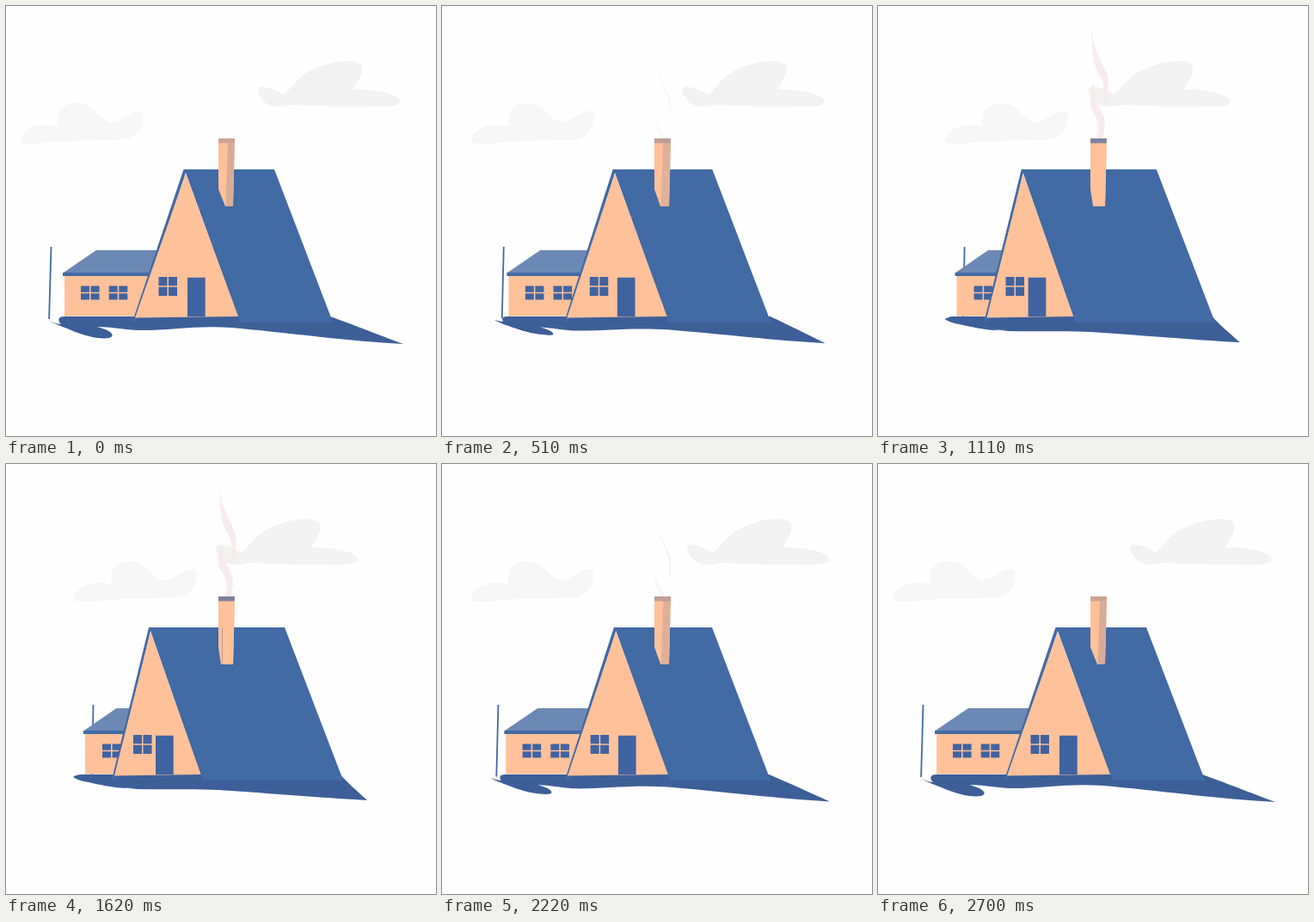
An HTML page for the animation above (3.18 s loop, 500x500 px).

```html
<!DOCTYPE html>
<html lang="en">
<head>
<meta charset="utf-8">
<title>House</title>
<style>
  html, body { margin: 0; width: 100%; height: 100%; overflow: hidden; background: #fefefe; }
  svg { display: block; width: 100%; height: 100%; }
</style>
</head>
<body>
<svg id="scene" viewBox="0 0 500 500"></svg>
<script>
const LOOP = 3180, STEP = 30, OPEN_END = 1350, CLOSE_START = 1590, CLOSE_END = 2700;
const ROOF = '#426aa4', DARK = '#3d5f98', PEACH = '#ffc19a';
const scene = document.getElementById('scene');
const clamp = v => Math.min(1, Math.max(0, v));
const lerp = (a, b, p) => a + (b - a) * p;

// Blends every number in two strings of the same structure.
function mix(a, b, p) {
  const ends = b.match(/[\d.]+/g);
  let i = 0;
  return a.replace(/[\d.]+/g, n => lerp(+n, +ends[i++], p).toFixed(2));
}

// Ease with bezier handles (x1, 0) and (x2, 1).
const ease = (x1, x2) => x => {
  let lo = 0, hi = 1;
  for (let i = 0; i < 24; i++) {
    const s = (lo + hi) / 2, r = 1 - s;
    if (3 * r * r * s * x1 + 3 * r * s * s * x2 + s * s * s < x) lo = s; else hi = s;
  }
  return lo * lo * (3 - 2 * lo);
};

// Progress from the wide pose (0) to the turned pose (1) and back.
const swing = (open, close) => t => t < CLOSE_START
  ? open(clamp(t / OPEN_END))
  : 1 - close(clamp((t - CLOSE_START) / (CLOSE_END - CLOSE_START)));

const track = keys => t => {
  if (t <= keys[0][0]) return keys[0][1];
  for (let i = 1; i < keys.length; i++) {
    const [t0, v0] = keys[i - 1], [t1, v1] = keys[i];
    if (t <= t1) return lerp(v0, v1, (t - t0) / (t1 - t0));
  }
  return keys[keys.length - 1][1];
};

const yard = swing(ease(.6, .15), ease(.75, .24));
const house = swing(ease(.76, .14), ease(.72, .12));
const leftSky = swing(ease(.68, .15), ease(.75, .24));
const rightSky = swing(ease(.68, .15), ease(.56, .17));
const smokeStage = track([[510, 0], [870, 1], [1110, 2], [1590, 2], [1860, 1.7], [2220, 0]]);
const smokeAlpha = track([[400, 0], [510, .35], [700, 1], [2080, 1], [2220, .75], [2400, 0]]);

const updates = [];
function path(fill, d = '') {
  const el = document.createElementNS('http://www.w3.org/2000/svg', 'path');
  el.setAttribute('fill', fill);
  el.setAttribute('d', d);
  scene.append(el);
  return el;
}

function morph(fill, progress, from, to, fillTo) {
  const el = path(fill);
  updates.push(t => {
    const p = progress(t);
    el.setAttribute('d', mix(from, to, p));
    if (fillTo) el.setAttribute('fill', mix(fill, fillTo, p));
  });
  return el;
}

function slide(fill, progress, dx, d) {
  const el = path(fill, d);
  updates.push(t => el.setAttribute('transform', `translate(${dx * progress(t)} 0)`));
}

function smoke(...stages) {
  const el = path('#f8ebeb');
  updates.push(t => {
    const g = smokeStage(t), i = Math.min(1, Math.floor(g));
    el.setAttribute('d', mix(stages[i], stages[i + 1], g - i));
    el.setAttribute('opacity', smokeAlpha(t));
  });
}

const rect = (x, y, w, h) => `M${x} ${y}h${w}v${h}h${-w}z`;
const panes = (x, y, w, h, gap) =>
  [0, 1, 2, 3].map(i => rect(x + (i % 2) * (w + gap), y + (i >> 1) * (h + gap), w, h)).join('');

// Sky
slide('#f6f6f6', leftSky, 62, 'M18 159C15 150 27 138 47 138Q55 138 61 140C59 130 61 113 81 113C103 112 105 131 121 135C133 136 143 121 157 122C163 126 161 152 137 155C120 157 80 156 55 158C45 160 25 161 18 159Z');
slide('#f2f2f2', rightSky, -49, 'M293 98C292 90 312 95 322 103C333 98 336 80 366 70C385 63 411 61 414 70C416 80 408 88 404 97C430 96 459 103 458 111C456 119 440 117 400 117C370 117 345 115 330 115C318 119 303 118 297 107C294 103 293 101 293 98Z');

// Pole, ground and annex
morph(ROOF, yard, 'M51.6 280L53.4 280L51 364L49.2 364Z', 'M100.6 280L102.4 280L101 362L99.2 362Z');
morph(DARK, yard,
  'M68 361L377 361C405 371 440 385 462 393C400 390 320 379 262 374C220 371 185 378 152 377C135 376 122 373 106 373C125 378 127 384 120 386C108 388 90 383 78 378C70 374 56 370 49 365C53 367 59 370 64 370C60 366 60 361 68 361Z',
  'M88 361L389 361C395 369 408 380 420 391C380 389 320 384 262 380C220 377 185 379 152 378C140 377 134 375 126 374C132 375 138 376 142 377C125 377 105 372 96 370C88 369 82 367 78 364C79 363 80 363 82 362C84 361 86 361 88 361Z');
morph(PEACH, yard, 'M68 313L179 313L179 360.5L68 360.5Z', 'M92 313L179 313L179 360.5L92 360.5Z');
morph('#6c89b5', yard, 'M66 310.5L105 284L179 284L179 310.5Z', 'M90 310.5L128.5 284L179 284L179 310.5Z');
morph(ROOF, yard, 'M66 310L179 310L179 314L66 314Z', 'M90 310L179 310L179 314L90 314Z');
slide('#4063a0', yard, 25, panes(87, 325.5, 10, 7.2, 1.6) + panes(119.7, 325.5, 10, 7.2, 1.6));

// Main house
morph(ROOF, house,
  'M206.5 190L312 190L377.5 361L380 368L272 368L209 194L151 367L147 367Z',
  'M166 190L324 190L391 365L392 368L228.5 368L168 194L127 367L123 367Z');
morph(PEACH, house, 'M209 195L270 361L150 362.5Z', 'M168 195L226.5 361L126 362.5Z');
slide('#4063a0', house, -37, rect(211, 315.7, 20.7, 45.6));
slide('#4063a0', house, -29.5, panes(177.5, 315, 10, 10.2, 1.5));

// Chimney
morph(PEACH, house, 'M247 155L266 155L264 233L255 233L247 213Z', 'M247 155L266 155L264 233L250 233L247 213Z');
morph('rgb(217,172,152)', house, 'M258 159L266 155L264 233L255.5 233Z', 'M251.5 159L266 155L264 233L251 233Z', 'rgb(255,193,154)');
morph('rgb(207,163,146)', house, 'M247 154L266 154L265.7 159.5L247 159.5Z', 'M247 154L266 154L265.7 159.5L247 159.5Z', 'rgb(125,129,159)');
const seam = path('#a58c90', rect(251, 190, .7, 43));
updates.push(t => seam.setAttribute('opacity', house(t) > .985 ? 1 : 0));

smoke(
  'M251 76C255 86 260 96 265 106C267 112 267 118 265 134C264 124 264 116 263 108C259 97 254 88 251 76Z',
  'M255 57C258 66 256 74 264 84C268 92 267 106 265 125C264 112 263 98 258 88C250 76 249 66 255 57Z',
  'M248 25C250 55 264 68 267 82C268 95 267 106 265 120C263 108 264 96 260 84C248 66 249 50 248 25Z');
smoke(
  'M246 127C248 136 252 140 255 147C257 150 258 152 258 154L255 154C254 150 253 148 251 144C248 138 247 134 246 127Z',
  'M254 115C256 126 260 126 263 136C264 142 263 148 262 154L254 154C258 146 256 142 252 136C243 124 246 120 254 115Z',
  'M250 88C252 110 258 118 263 130C265 138 263 146 262 154L254 154C258 142 258 136 251 126C244 114 247 104 250 88Z');

const start = performance.now();
function draw() {
  const elapsed = (performance.now() - start) % LOOP;
  const t = Math.floor(elapsed / STEP) * STEP;
  updates.forEach(update => update(t));
  requestAnimationFrame(draw);
}
draw();
</script>
</body>
</html>
```
